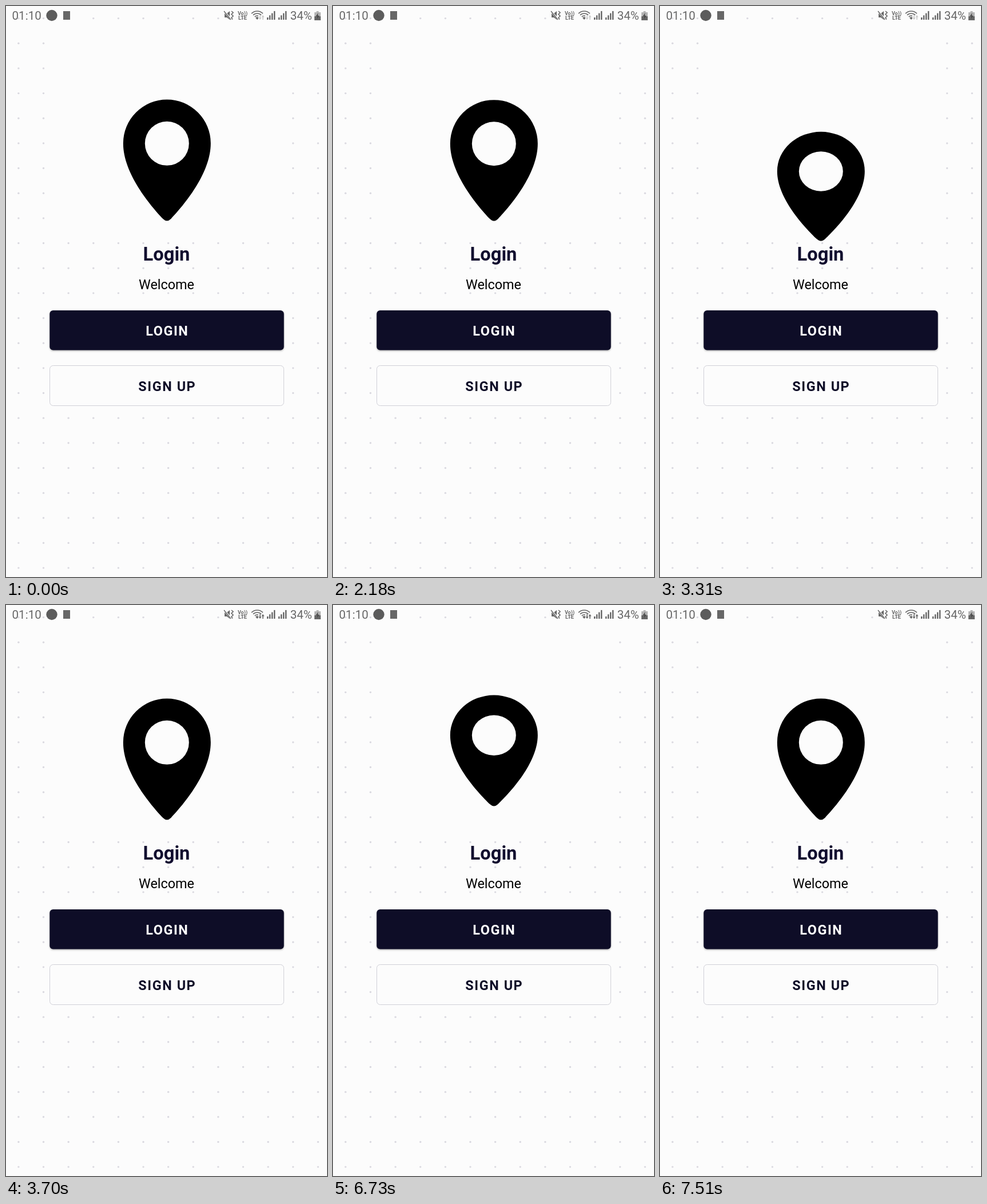
These frames come from a looping animation (561 by 998 pixels, 8 s). An HTML page with a canvas:

```html
<!DOCTYPE html>
<html lang="en">
<head>
<meta charset="utf-8">
<title>Login screen</title>
<style>
  html, body { margin: 0; width: 100%; height: 100%; overflow: hidden; background: #fcfcfc; }
  canvas { display: block; width: 561px; height: 998px; }
</style>
</head>
<body>
<canvas id="stage" width="561" height="998"></canvas>
<script>
const ctx = document.getElementById('stage').getContext('2d');
const LOOP = 8000;
const BG = '#fcfcfc', NAVY = '#0e0d27', GREY = '#676767', FAINT = '#c9c9c9';
const HOPS = [2160, 6167];
const PIN_MID = 269.5;

// Each pose: time after the hop starts, vertical shift, vertical scale, easing into it
const POSES = [
  { t: 0, y: 0, s: 1 },
  { t: 330, y: 60, s: 0.851, ease: [0.4, 0.6] },
  { t: 900, y: -116, s: 1, ease: [0.4, 0.46] },
  { t: 1140, y: 46, s: 0.9, ease: [0.45, 0.6] },
  { t: 1345, y: 0, s: 1, ease: [0.4, 0.5] }
];

// Cubic bezier (x1, 0, x2, 1), solved by bisection
function bezier(x, [x1, x2]) {
  let lo = 0, hi = 1, u = 0.5;
  for (let i = 0; i < 24; i++) {
    u = (lo + hi) / 2;
    const v = 1 - u;
    if (3 * v * v * u * x1 + 3 * v * u * u * x2 + u * u * u < x) lo = u; else hi = u;
  }
  return u * u * (3 - 2 * u);
}

function pinPose(time) {
  for (const start of HOPS) {
    const t = time - start;
    for (let i = 1; i < POSES.length; i++) {
      const a = POSES[i - 1], b = POSES[i];
      if (t < a.t || t >= b.t) continue;
      const k = bezier((t - a.t) / (b.t - a.t), b.ease);
      return { y: a.y + (b.y - a.y) * k, s: a.s + (b.s - a.s) * k };
    }
  }
  return POSES[0];
}

function text(str, x, y, size, { color = GREY, weight = 400, align = 'left', spacing = 0 } = {}) {
  ctx.font = `${weight} ${size}px Roboto, sans-serif`;
  ctx.letterSpacing = spacing + 'px';
  ctx.textAlign = align;
  ctx.fillStyle = color;
  ctx.fillText(str, x, y);
}

function shape(d, color) {
  ctx.fillStyle = color;
  ctx.fill(new Path2D(d), 'evenodd');
}

function line(d, color, width) {
  ctx.strokeStyle = color;
  ctx.lineWidth = width;
  ctx.stroke(new Path2D(d));
}

function disc(x, y, r, color) {
  ctx.fillStyle = color;
  ctx.beginPath();
  ctx.arc(x, y, r, 0, Math.PI * 2);
  ctx.fill();
}

function box(x, y, w, h, r) {
  ctx.beginPath();
  ctx.roundRect(x, y, w, h, r);
}

function drawDots() {
  for (let row = 0; row < 23; row++) {
    for (let col = 0; col < 13; col++) {
      const x = 21.9 + col * 43.62, y = 21.6 + row * 43.66;
      const inPanel = x > 76 && x < 486 && y > 40 && y < 400;
      if (!inPanel) disc(x, y, 1.7, '#dad9e0');
    }
  }
}

function drawMute() {
  shape('M382 13h4l5-4v15l-5-4h-4z', GREY);
  line('M380 8L394 24', BG, 3.2);
  line('M381 9L393 24', GREY, 1.5);
  line('M394 9l3 2.5-3 3 3 3-3 3 2 3', GREY, 1.6);
}

function drawWifi(active) {
  for (const r of [14, 10, 6]) {
    ctx.beginPath();
    ctx.arc(439, 23, r, -Math.PI * 0.75, -Math.PI * 0.25);
    ctx.strokeStyle = GREY;
    ctx.lineWidth = 1.7;
    ctx.stroke();
  }
  shape('M439 24l-3-3.5q3-2.5 6 0z', GREY);
  ctx.fillStyle = BG;
  ctx.fillRect(441, 16, 11, 9);
  const color = active ? GREY : FAINT;
  shape('M443.2 16h1.6v4.5h1.8l-2.6 3.5-2.6-3.5h1.8z', color);
  shape('M448.2 24h1.6v-4.5h1.8l-2.6-3.5-2.6 3.5h1.8z', color);
}

function drawSignal(x) {
  ctx.fillStyle = GREY;
  for (let i = 0; i < 4; i++) {
    const h = 4 + i * 3.7;
    ctx.fillRect(x + i * 4, 24 - h, 2.4, h);
  }
}

function drawStatus(active) {
  text('01:10', 10.5, 24, 20.6);
  disc(80, 16.5, 9.7, '#5c5c5c');
  ctx.fillStyle = GREY;
  ctx.fillRect(100, 9, 12, 15);
  drawMute();
  text('Vo))', 413.5, 15.5, 9, { weight: 700, align: 'center' });
  text('LTE', 413.5, 24.3, 9.4, { weight: 700, align: 'center' });
  drawWifi(active);
  drawSignal(456);
  drawSignal(476);
  text('34%', 496.7, 24, 20.6);
  shape('M542.5 9h4v2h3.5v7h-11v-7h3.5z', '#b5b5b5');
  shape('M539 18h11v7h-11z', GREY);
  shape('M545.5 12l-4 6h2.7l-.7 5 4.2-6.3h-2.7z', '#4a4a4a');
}

function drawPin(time) {
  const { y, s } = pinPose(time);
  ctx.save();
  ctx.translate(0, PIN_MID + y);
  ctx.scale(1, s);
  ctx.translate(0, -PIN_MID);
  shape('M204.8 240A76.5 76.5 0 0 1 357.8 240C357.8 293 310 349 288.3 372Q281.3 379 274.3 372C252.6 349 204.8 293 204.8 240Z' +
    'M242.8 240.3a38.5 38.5 0 1 0 77 0a38.5 38.5 0 1 0 -77 0Z', '#000');
  ctx.restore();
}

function drawForm() {
  const centered = { align: 'center', color: NAVY, weight: 700 };
  text('Login', 280.5, 445, 32.7, { ...centered, color: '#110d2f' });
  text('Welcome', 280.5, 495, 23.4, { align: 'center', color: '#000' });

  ctx.save();
  ctx.shadowColor = 'rgba(0,0,0,.28)';
  ctx.shadowBlur = 3;
  ctx.shadowOffsetY = 1.5;
  ctx.fillStyle = NAVY;
  box(76.3, 532, 409.4, 69.5, 6);
  ctx.fill();
  ctx.restore();
  text('LOGIN', 281.8, 576, 23.4, { ...centered, color: '#fff', spacing: 1.56 });

  ctx.fillStyle = BG;
  ctx.strokeStyle = '#d0d0d7';
  ctx.lineWidth = 1;
  box(76.5, 628.5, 409, 70, 6);
  ctx.fill();
  ctx.stroke();
  text('SIGN UP', 281.8, 673.3, 23.4, { ...centered, spacing: 1.56 });
}

function draw(now) {
  const time = now % LOOP;
  const active = (time >= 3700 && time < 4670) || time >= 5680;
  ctx.fillStyle = BG;
  ctx.fillRect(0, 0, 561, 998);
  drawDots();
  drawStatus(active);
  drawForm();
  drawPin(time);
}

let begin;
function tick(now) {
  begin ??= now;
  draw(Math.max(0, now - begin));
  requestAnimationFrame(tick);
}
requestAnimationFrame(tick);
</script>
</body>
</html>
```
